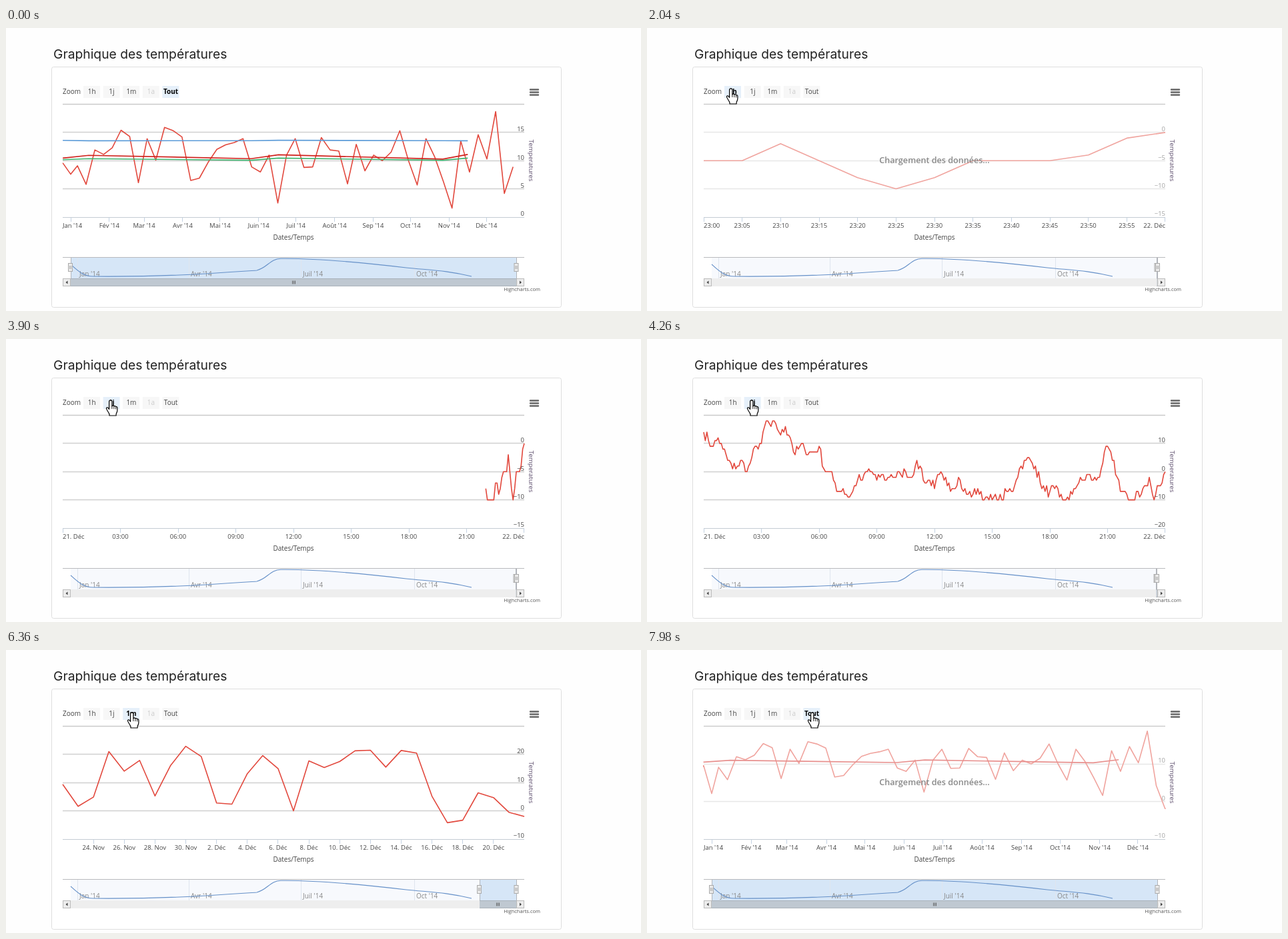
These frames come from a looping animation (952 px wide and 425 px high, 8 s). An HTML page:

```html
<!DOCTYPE html>
<html lang="fr">
<head>
<meta charset="utf-8">
<title>Graphique des températures</title>
<style>
html, body { margin: 0; width: 100%; height: 100%; overflow: hidden; background: #fefefe; }
svg { display: block; }
text { font: 9.5px "Open Sans", "Noto Sans", sans-serif; fill: #444; white-space: pre; }
.title { font: 19.3px Inter, sans-serif; fill: #222; }
.m { text-anchor: middle; }
.e { text-anchor: end; }
.ten { font-size: 10px; }
.bold { font-weight: 700; fill: #000; }
.off { fill: #ccc; }
.nav { font-size: 10px; fill: #888; }
.side { font-size: 9.7px; fill: #5a4a6a; }
.credit { font-size: 7.5px; fill: #555; }
.load { font-size: 12.6px; font-weight: 600; fill: #888; }
</style>
</head>
<body>
<svg id="stage" width="952" height="425" viewBox="0 0 952 425"></svg>
<script>
const stage = document.getElementById('stage');
const LOOP = 8000, LEFT = 85, RIGHT = 777, WIDTH = RIGHT - LEFT, TOP = 114.5, BOTTOM = 284;
const RED = '#e2483d', DARK = '#d0211c', GREEN = '#3db56f', BLUE = '#5b9bd8';

// Temperatures
const weekly = [9.6, 7.6, 9.1, 5.8, 11.9, 11.1, 12.3, 15.4, 14.3, 6.1, 13.9, 10.1, 15.9, 15.3, 14.2, 6.5, 6.9, 9.7,
  12, 12.8, 13.2, 13.9, 8.9, 8, 11, 2.5, 11, 13.9, 8.8, 8.9, 14.1, 11.9, 11.7, 5.9, 12.9, 8.2, 11, 10, 11.5, 15.3,
  10, 5.7, 13.9, 10.7, 6.3, 1.6, 13.5, 8, 14.6, 10.3, 18.7, 4.2, 8.9];
const weeklyFull = weekly.map((v, i) => i === 1 ? 2.1 : i === 52 ? -2 : v);
const daily = [9.4, 1.6, 4.9, 21, 14.1, 17.9, 5.3, 16, 22.9, 19.3, 2.8, 2.4, 13.2, 19.6, 15, 0, 17.7, 15.4, 17.5,
  21.3, 21.5, 15.5, 21.4, 20.5, 5.2, -4.2, -3.3, 6.4, 4.7, -.5, -2];
const quarterHours = [14, 11, 9, 12, 8, 4, 1, 2, 4, 0, 5, 9, 10, 18, 16, 17, 13, 16, 12, 6, 9, 8, 7, 7, 9, 1, 0, -3,
  -7, -6, -9, -7, -3, -3, 0, 0, -3, -1, -3, -1, -2, -1, 0, -2, 2, 2, -4, -3, -6, -1, -3, -4, -6, -2, -7, -8, -8, -6,
  -10, -9, -10, -10, -10, -7, -7, -3, 2, 4, 4, 2, -4, -7, -7, -6, -9, -10, -10, -6, -4, -3, -1, -3, -2, 3, 9, 4, -2, -7];
const lastTwoHours = [-8, -10, -10, -10, -10, -10, -7, -7, -9, -8, -6, -5,
  -5, -5, -2, -5, -8, -10, -8, -5, -5, -5, -4, -1, 0];

let seed = 7;
const random = () => (seed = seed * 16807 % 2147483647) / 2147483647;
const fiveMinutes = Array.from({ length: 264 }, (_, i) => {
  const k = Math.floor(i / 3), f = i % 3 / 3, a = quarterHours[k], b = quarterHours[k + 1] ?? -8;
  const noise = f ? (random() - .5) * 4 : 0;
  return Math.min(18, Math.max(-10, Math.round(a + (b - a) * f + noise)));
}).concat(lastTwoHours);

// Series: points are [x, value]
const spread = (values, width) => values.map((v, i) => [RIGHT - width * (1 - i / (values.length - 1)), v]);
const dayX = (day, scale) => 97 + day * scale;
const weeks = (values, scale) =>
  values.map((v, i) => [dayX(i < 2 ? [-6.4, 0][i] : 5.4 + 7 * (i - 2), scale), v]);
const trend = (values, scale) =>
  values.map((v, i) => [dayX([-6.4, 14.5, 145, 167, 299, 319][i], scale), v]);
const darkTrend = [10.46, 10.95, 10.36, 11.05, 10.28, 11.1];
const yearLines = [
  [RED, weeks(weekly, 1.866)],
  [BLUE, trend([13.6, 13.52, 13.55, 13.62, 13.55, 13.52], 1.866)],
  [GREEN, trend([10.18, 10.36, 10.08, 10.45, 10.08, 10.45], 1.866)],
  [DARK, trend(darkTrend, 1.866)]
];
const fullLines = [[RED, weeks(weeklyFull, 1.913)], [DARK, trend(darkTrend, 1.913)]];
const red = (values, width) => [[RED, spread(values, width)]];

// Horizontal axes: [x, label]
const months = ['Jan', 'Fév', 'Mar', 'Avr', 'Mai', 'Juin', 'Juil', 'Août', 'Sep', 'Oct', 'Nov', 'Déc'];
const yearAxis = scale => months.map((m, i) =>
  [dayX((Date.UTC(2014, i) - Date.UTC(2014, 0)) / 864e5, scale), m + " '14"]);
const two = n => String(n).padStart(2, '0');
const hourAxis = Array.from({ length: 13 }, (_, i) => [LEFT + WIDTH * i / 12, i < 12 ? '23:' + two(i * 5) : '22. Déc']);
const dayAxis = Array.from({ length: 9 }, (_, i) =>
  [LEFT + WIDTH * i / 8, i % 8 ? two(i * 3) + ':00' : i ? '22. Déc' : '21. Déc']);
const monthAxis = Array.from({ length: 14 }, (_, i) =>
  [LEFT + WIDTH * (i + 1) / 15, i < 4 ? 24 + 2 * i + '. Nov' : 2 * i - 6 + '. Déc']);

// Successive views; each one inherits from the one before
const views = [
  { at: 0, chosen: 4, axis: yearAxis(1.866), min: 0, step: 5, rows: 4, nav: [97, 765], lines: yearLines, loading: false },
  { at: 1860, chosen: 0, axis: hourAxis, nav: [764.5, 765.5], lines: [] },
  { at: 1980, loading: true },
  { at: 2040, min: -15, lines: red(lastTwoHours.slice(12), WIDTH) },
  { at: 2220, loading: false },
  { at: 3900, chosen: 1, axis: dayAxis, lines: red(lastTwoHours, WIDTH / 12) },
  { at: 4020, loading: true },
  { at: 4080, min: -20, step: 10, lines: red(fiveMinutes, WIDTH), nav: [763.5, 764.5] },
  { at: 4260, loading: false },
  { at: 5880, chosen: 2, axis: monthAxis, lines: red(fiveMinutes, WIDTH / 30) },
  { at: 6000, loading: true },
  { at: 6180, min: -10, lines: red(daily, WIDTH), nav: [710, 765] },
  { at: 6360, loading: false },
  { at: 7560, chosen: 4, axis: yearAxis(1.913), lines: red(daily, 57) },
  { at: 7740, loading: true },
  { at: 7920, rows: 3, lines: fullLines, nav: [97, 765] }
];
views.forEach((v, i) => i && (views[i] = { ...views[i - 1], ...v }));

// Pointer: [time, x, y]
const pointerKeys = [[180, 923, 70], [240, 880, 86], [300, 815, 97], [360, 765, 107], [420, 717, 113], [480, 658, 113],
  [540, 569, 114], [600, 508, 114], [660, 443, 114], [720, 411, 114], [780, 370, 114], [840, 294, 111], [900, 227, 110],
  [960, 185, 112], [1020, 128, 110], [1080, 110, 104], [1140, 103, 98], [1320, 117, 91], [1500, 126, 91],
  [3000, 126, 91], [3480, 157, 92], [4860, 157, 92], [5280, 189, 94], [6840, 189, 94], [7080, 248, 94], [LOOP, 248, 94]];

function pointerAt(time) {
  const t = Math.floor(time / 60) * 60;
  if (t < 180) return null;
  const i = Math.max(1, pointerKeys.findIndex(k => k[0] >= t));
  const [ta, xa, ya] = pointerKeys[i - 1], [tb, xb, yb] = pointerKeys[i];
  const f = (t - ta) / (tb - ta);
  return [Math.round(xa + (xb - xa) * f), Math.round(ya + (yb - ya) * f)];
}

// SVG helpers
const text = (x, y, s, cls = '', more = '') => `<text x="${x}" y="${y}" class="${cls}" ${more}>${s}</text>`;
const rect = (x, y, w, h, fill, more = '') => `<rect x="${x}" y="${y}" width="${w}" height="${h}" fill="${fill}" ${more}/>`;
const path = (d, stroke, width = 1, fill = 'none') =>
  `<path d="${d}" stroke="${stroke}" stroke-width="${width}" fill="${fill}" stroke-linejoin="round"/>`;
const crisp = n => Math.floor(n) + .5;

const buttons = ['1h', '1j', '1m', '1a', 'Tout'].map((label, i) => ({ label, x: 116 + 29.6 * i }));
const over = (b, p) => p && p[0] >= b.x && p[0] <= b.x + 25 && p[1] >= 87 && p[1] <= 105;

function drawButtons(chosen, pointer) {
  return text(85, 99, 'Zoom', 'ten') + buttons.map((b, i) => {
    const fill = i === chosen ? '#e6f0fa' : i !== 3 && over(b, pointer) ? '#e4e5e6' : '#f7f7f7';
    return rect(b.x, 87, 25, 18, fill) +
      text(b.x + 12.7, 99, b.label, 'ten m' + (i === chosen ? ' bold' : i === 3 ? ' off' : ''));
  }).join('');
}

function drawPlot({ axis, min, step, rows, lines, loading }) {
  const y = v => BOTTOM - (v - min) / (step * rows) * (BOTTOM - TOP);
  let s = '';
  for (let i = 1; i <= rows; i++) s += path(`M85 ${crisp(y(min + i * step))}H777`, '#d0d0d0', 1.3);
  for (const [color, points] of lines)
    s += path('M' + points.map(([x, v]) => x.toFixed(1) + ' ' + y(v).toFixed(1)).join('L'), color, 1.6);
  for (let i = 0; i < rows; i++) {
    const v = min + i * step;
    s += text(777, y(v) - 1.6, String(v).replace('-', '−'), 'e');
  }
  if (loading) s += rect(85, 115, WIDTH, 169, '#fff', 'opacity=".5"') + text(431, 203, 'Chargement des données...', 'load m');
  s += path('M85 114.5H777', '#c8c8c8') + path('M85 284.5H777', '#c4ccd4');
  for (const [x, label] of axis) {
    const half = label.length * 2.1;
    const place = x - half < LEFT ? [85, ''] : x + half > RIGHT ? [777, 'e'] : [x, 'm'];
    s += path(`M${crisp(Math.min(x, 776))} 285v6`, '#c4d2e2') + text(place[0], 300, label, place[1]);
  }
  return s + text(431, 318, 'Dates/Temps', 'ten m') +
    text(0, 0, 'Temperatures', 'side m', 'transform="translate(784 199) rotate(90)"');
}

const handle = x => rect(x - 3, 353.5, 6, 12, '#ececec', 'stroke="#aaa"') +
  path(`M${x - 1} 357v5M${x + 1} 357v5`, '#999', .8);

function drawNavigator([from, to]) {
  let s = rect(97, 345, 668, 31, '#f7f9fd') + rect(from, 345, to - from, 31, '#d6e6f7');
  [[108, 'Jan'], [275, 'Avr'], [443, 'Juil'], [613, 'Oct']].forEach(([x, m]) => {
    s += path(`M${x - .5} 345v31`, '#dfe5ee') + text(x + 2, 373, m + " '14", 'nav');
  });
  s += path('M97 355C108 365 116 373 131 373C200 373.5 250 372 300 369C340 366 360 365 376 364C392 360 396 346.5 412 346.3C470 345.5 540 353 600 360C640 364 660 364 698 373', '#6590c8', 1.1);
  s += path('M85 344.5H777', '#b9babd') + rect(85, 376, WIDTH, 12, '#eee');
  const w = Math.max(3, to - from), mid = crisp((from + to) / 2);
  s += rect(from, 376, w, 12, '#bfc8d1') + path(`M${from} 376.5h${w}M${from} 387.5h${w}`, '#aab2ba');
  if (w > 20) s += path(`M${mid - 2} 379.5v5m2-5v5m2-5v5`, '#555', .9);
  s += path(`M${crisp(from)} 345v31M${crisp(to)} 345v31`, '#b2b5bb');
  for (const [x, arrow] of [[85.5, 'M92.5 379.5v5l-3-2.5z'], [765.5, 'M770 379.5v5l3-2.5z']])
    s += rect(x, 376.5, 11, 11, '#ececec', 'stroke="#bbb"') + path(arrow, 'none', 0, '#444');
  return s + handle(from - .5) + handle(to) + text(801, 395, 'Highcharts.com', 'credit e');
}

function drawPointer(p) {
  if (!p) return '';
  const hand = buttons.some((b, i) => i !== 3 && over(b, p));
  const d = hand
    ? 'M-2.4 2a2.15 2.15 0 0 1 4.3 0V9c.4-1.5 2.8-1.4 3 .3c.5-1.2 2.6-.9 2.8.8c.6-.9 2.2-.3 2.2 1.4V15c0 3-1.5 4-1.8 6V23H-2V21C-3 18-6 15-6.5 12.5C-6.8 10.5-4.6 10.3-3.8 11.6L-2.4 13.5Z'
    : 'M0 0V16l3.7-3.5 2.5 6 2.4-1-2.5-5.8H11.5Z';
  const folds = hand ? path('M1.9 9v4M4.9 10v3.2M7.7 11v2.4', '#000', .9) : '';
  return `<g transform="translate(${p})">${path(d, '#000', 1.2, '#fff')}${folds}</g>`;
}

const fixed = text(71, 46, 'Graphique des températures', 'title') +
  rect(68.5, 58.5, 764, 361, '#fff', 'rx="3" stroke="#dedede"') +
  '<path d="M786 92.5h12m-12 4h12m-12 4h12" stroke="#666" stroke-width="2.4" stroke-linecap="round"/>';

let shown = '';
function render(now) {
  const t = now % LOOP;
  const view = views.findLast(v => v.at <= t);
  const pointer = pointerAt(t);
  const key = view.at + ':' + pointer;
  if (key !== shown) {
    shown = key;
    stage.innerHTML = fixed + drawButtons(view.chosen, pointer) + drawPlot(view) + drawNavigator(view.nav) + drawPointer(pointer);
  }
  requestAnimationFrame(render);
}
render(performance.now());
</script>
</body>
</html>
```
